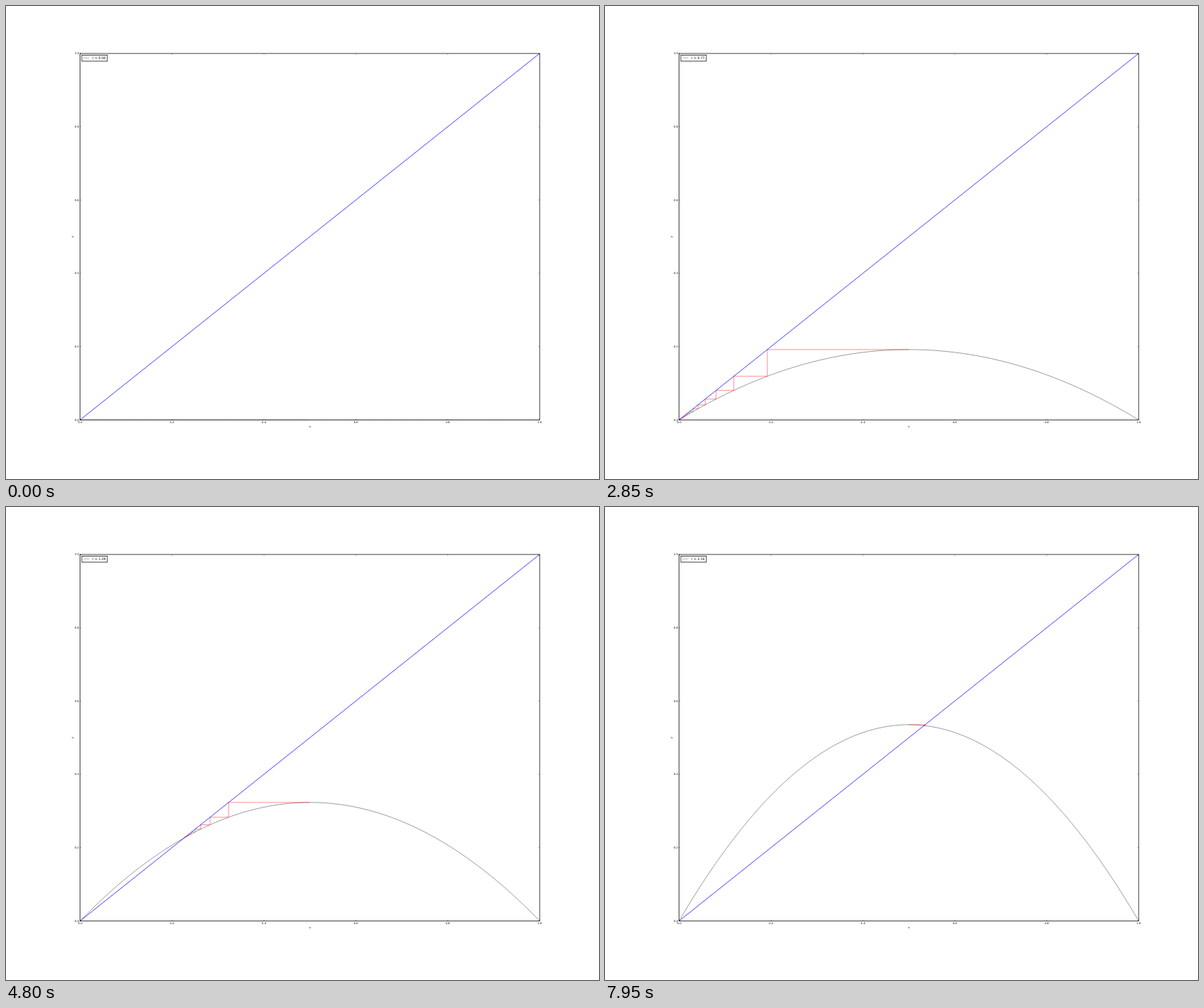
An HTML page with a canvas that plays this animation: 837 px wide and 669 px high, repeating every 8 s.

```html
<!DOCTYPE html>
<html lang="en">
<head>
<meta charset="utf-8">
<title>Logistic map cobweb</title>
<style>
  html, body { margin: 0; width: 100%; height: 100%; overflow: hidden; background: #fff; }
  canvas { display: block; }
</style>
</head>
<body>
<canvas id="plot" width="837" height="669"></canvas>
<script>
const ctx = document.getElementById('plot').getContext('2d');
const LOOP = 8000, STEP = 150, R_STEP = 4 / 99;
const box = { left: 104.6, top: 67.1, right: 753.2, bottom: 585.4 };
const width = box.right - box.left, height = box.bottom - box.top;
const px = x => box.left + x * width;
const py = y => box.bottom - y * height;

function line(points, color, weight) {
  ctx.beginPath();
  for (const [x, y] of points) ctx.lineTo(x, y);
  ctx.strokeStyle = color;
  ctx.lineWidth = weight;
  ctx.stroke();
}

function text(str, x, y, size, align) {
  ctx.font = size + 'px "DejaVu Sans", sans-serif';
  ctx.textAlign = align;
  ctx.fillStyle = '#000';
  ctx.fillText(str, x, y);
}

function frame(x, y, w, h, weight) {
  ctx.strokeStyle = '#000';
  ctx.lineWidth = weight;
  ctx.strokeRect(x, y, w, h);
}

function drawAxes() {
  frame(box.left, box.top, width, height, 0.75);
  for (let i = 0; i <= 5; i++) {
    const v = i / 5, x = px(v), y = py(v), label = v.toFixed(1);
    line([[x, box.bottom], [x, box.bottom - 1.7]], '#000', 0.35);
    line([[x, box.top], [x, box.top + 1.7]], '#000', 0.35);
    line([[box.left, y], [box.left + 1.7, y]], '#000', 0.35);
    line([[box.right, y], [box.right - 1.7, y]], '#000', 0.35);
    text(label, x, 590.4, 3.84, 'center');
    text(label, 103, y + 1.3, 3.84, 'right');
  }
  text('x', px(0.5), 596, 3.84, 'center');
  ctx.save();
  ctx.translate(94.6, py(0.5));
  ctx.rotate(-Math.PI / 2);
  text('y', 0, 0, 3.84, 'center');
  ctx.restore();
}

function drawLegend(r) {
  ctx.fillStyle = '#fff';
  ctx.fillRect(107, 69.4, 36, 8.6);
  frame(107, 69.4, 36, 8.6, 0.75);
  line([[109.5, 73.4], [117.5, 73.4]], '#000', 0.3);
  text('r = ' + r.toFixed(2), 121.9, 75.2, 4.6, 'left');
}

function drawMap(r) {
  const f = x => r * x * (1 - x);
  const curve = [], web = [];
  for (let i = 0; i <= 200; i++) curve.push([px(i / 200), py(f(i / 200))]);
  let x = 0.5;
  for (let i = 0; i < 100; i++) {
    const y = f(x);
    web.push([px(x), py(y)], [px(y), py(y)]);
    x = y;
  }
  ctx.save();
  ctx.beginPath();
  ctx.rect(box.left, box.top, width, height);
  ctx.clip();
  line(curve, '#000', 0.4);
  line(web, '#f00', 0.45);
  line([[px(0), py(0)], [px(1), py(1)]], '#00f', 0.75);
  ctx.restore();
}

function draw(now) {
  const r = Math.floor(now % LOOP / STEP) * R_STEP;
  ctx.fillStyle = '#fff';
  ctx.fillRect(0, 0, 837, 669);
  drawMap(r);
  drawAxes();
  drawLegend(r);
}

const start = performance.now();
function tick() {
  draw(performance.now() - start);
  requestAnimationFrame(tick);
}
ctx.lineJoin = 'miter';
ctx.miterLimit = 2;
tick();
</script>
</body>
</html>
```
